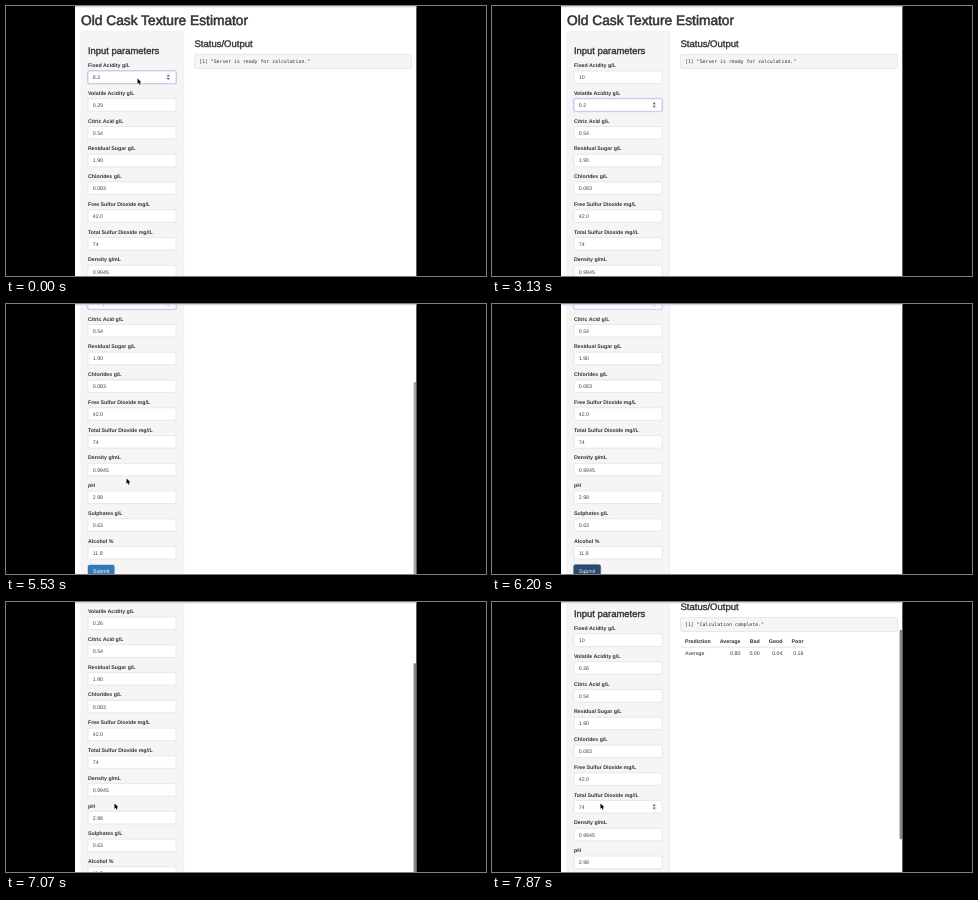
An HTML page with a canvas that plays this animation: 480x270 px, repeating every 8 s.

```html
<!DOCTYPE html>
<html lang="en">
<head>
<meta charset="utf-8">
<title>Old Cask Texture Estimator</title>
<style>
html, body { margin: 0; width: 100%; height: 100%; overflow: hidden; background: #000; }
canvas { display: block; width: 100vw; height: 100vh; }
</style>
</head>
<body>
<canvas id="stage"></canvas>
<script>
const W = 480, H = 270, LOOP = 8000, STEP = 1000 / 15, BLINK = 440;
const PAGE = { left: 69, right: 410.6 };
const FIELD = { x: 82, y: 65, w: 88, h: 12.5, pitch: 27.76 };
const SANS = '"Liberation Sans", Arial, sans-serif';
const MONO = '"DejaVu Sans Mono", monospace';
const PLAIN = `5.25px ${SANS}`, BOLD = `bold ${PLAIN}`;
const CLICK = 6133, RESULT = 7265;

const FIELDS = [
  ['Fixed Acidity g/L', '8.2'], ['Volatile Acidity g/L', '0.29'],
  ['Citric Acid g/L', '0.54'], ['Residual Sugar g/L', '1.90'],
  ['Chlorides g/L', '0.083'], ['Free Sulfur Dioxide mg/L', '42.0'],
  ['Total Sulfur Dioxide mg//L', '74'], ['Density g/mL', '0.9945'],
  ['pH', '2.98'], ['Sulphates g/L', '0.63'], ['Alcohol %', '11.8']
];
const SCORES = { Average: '0.80', Bad: '0.00', Good: '0.04', Poor: '0.16' };

// One editing session per field; edits map a time to the new text
const SESSIONS = [
  { from: -500, to: 2100, select: 133, caret: 600, blink: 1333, edits: { 600: '', 1333: '1', 1600: '10' } },
  { from: 2100, to: CLICK, select: 2200, caret: 2667, blink: 2667, edits: { 3067: '0.2', 4000: '0.26' } }
];

// Pointer moves: start, end, target
const MOVES = [
  [67, 200, 186, 19], [200, 400, 139, 72], [1000, 1200, 138, 100],
  [4333, 4600, 120.5, 174.5], [5600, CLICK, 93, 268.5], [6333, 6600, 108.5, 201.5]
];

const canvas = document.getElementById('stage');
const ctx = canvas.getContext('2d');

const ramp = (t, from, to) => Math.min(1, Math.max(0, (t - from) / (to - from)));
const within = (t, from, to) => t >= from - 1 && t < to - 1;

function smooth(t, from, to) {
  const u = ramp(t, from, to);
  return u * u * (3 - 2 * u);
}

const scrollAt = t => 100 * smooth(t, 4830, 5133) - 67 * smooth(t, 6667, 7700);
const barAlpha = t => ramp(t, 4800, 4866) - ramp(t, 5467, 5733) + ramp(t, 6733, 6799);

function pointerAt(t) {
  let x = 131.5, y = 72.5;
  for (const [from, to, toX, toY] of MOVES) {
    const k = smooth(t, from, to);
    x += (toX - x) * k;
    y += (toY - y) * k;
  }
  return { x, y };
}

function text(str, x, y, font, color, align = 'left') {
  ctx.font = font;
  ctx.fillStyle = color;
  ctx.textAlign = align;
  ctx.fillText(str, x, y);
}

// Medium weight: regular letters with a thin stroke
function heading(str, x, y, size) {
  text(str, x, y, `${size}px ${SANS}`, '#333');
  ctx.strokeStyle = '#333';
  ctx.lineWidth = size * 0.04;
  ctx.strokeText(str, x, y);
}

function box(x, y, w, h, fill, stroke, line = 0.4) {
  ctx.beginPath();
  ctx.roundRect(x, y, w, h, 1.5);
  ctx.fillStyle = fill;
  ctx.fill();
  ctx.strokeStyle = stroke;
  ctx.lineWidth = line;
  ctx.stroke();
}

function spinner(x, y) {
  ctx.fillStyle = '#f4f4f4';
  ctx.fillRect(x - 2.2, y - 3.8, 4.4, 7.6);
  ctx.fillStyle = '#555';
  for (const d of [-1, 1]) {
    ctx.beginPath();
    ctx.moveTo(x - 1.4, y + d * 0.8);
    ctx.lineTo(x + 1.4, y + d * 0.8);
    ctx.lineTo(x, y + d * 2.7);
    ctx.fill();
  }
}

function valueAt(i, t) {
  let value = FIELDS[i][1];
  for (const [time, edit] of Object.entries(SESSIONS[i]?.edits ?? {})) {
    if (t >= time - 1) value = edit;
  }
  return value;
}

function glow(x, y, w, h, alpha) {
  ctx.save();
  ctx.globalAlpha = alpha;
  box(x, y, w, h, '#fff', 'rgba(150,170,225,0.3)', 2.2);
  box(x, y, w, h, '#fff', '#a9b8dc', 0.6);
  ctx.restore();
}

function field(i, t, pointer) {
  const { x, w, h } = FIELD, y = FIELD.y + i * FIELD.pitch;
  const session = SESSIONS[i], value = valueAt(i, t), textX = x + 4.8;
  const focus = session ? ramp(t, session.from, session.from + 200) - ramp(t, session.to, session.to + 200) : 0;
  const hover = pointer && pointer.x > x && pointer.x < x + w && pointer.y > y && pointer.y < y + h;

  text(FIELDS[i][0], x, y - 3.9, BOLD, '#333');
  box(x, y, w, h, '#fff', '#ccc');
  if (focus > 0) glow(x, y, w, h, focus);

  ctx.font = PLAIN;
  const width = ctx.measureText(value).width;
  if (session && within(t, session.select, session.caret)) {
    ctx.fillStyle = '#b3d7ff';
    ctx.fillRect(textX, y + 3, width, 6.6);
  }
  text(value, textX, y + 8.2, PLAIN, '#444');
  if (session && within(t, session.caret, session.to)) {
    const lit = Math.floor((t + 1 - session.blink) / BLINK) % 2 === 0;
    ctx.fillStyle = '#333';
    if (lit) ctx.fillRect(textX + width + 0.2, y + 3.2, 0.5, 6.2);
  }
  if (focus > 0.5 || hover) spinner(162.2, y + h / 2);
}

function button(t) {
  const pressed = t >= CLICK;
  if (pressed) box(81.6, 360.6, 27.1, 13.3, '#d5dbe5', '#8a8f99', 0.8);
  box(82, 361, 26.3, 12.5, pressed ? '#2b4a70' : '#337ab7', pressed ? '#22395a' : '#2e6da4');
  text('Submit', 95.1, 369, PLAIN, pressed ? '#dce8ff' : '#fff', 'center');
}

function table() {
  const head = 73.8, row = 85.8, gap = 9.1;
  text('Average', 193, row, PLAIN, '#333');
  text('Prediction', 193, head, BOLD, '#333');
  let right = 193 + ctx.measureText('Prediction').width;
  for (const [name, score] of Object.entries(SCORES)) {
    ctx.font = BOLD;
    right += gap + Math.max(10.2, ctx.measureText(name).width);
    text(name, right, head, BOLD, '#333', 'right');
    text(score, right, row, PLAIN, '#333', 'right');
  }
  ctx.fillStyle = '#ddd';
  ctx.fillRect(189, 77.7, right - 186, 0.8);
}

function output(t) {
  const done = t >= RESULT;
  const message = done ? 'Calculation complete.' : 'Server is ready for calculation.';
  heading('Status/Output', 188.5, 41, 9.5);
  box(188.5, 48.5, 217, 14, '#f5f5f5', '#ccc');
  text(`[1] "${message}"`, 193, 57, `4.875px ${MONO}`, '#333');
  if (done) table();
}

function arrow({ x, y }) {
  const points = [[0, 0], [0, 5.4], [1.3, 4.3], [2.2, 6.3], [3.1, 5.9], [2.2, 4], [3.8, 3.8]];
  ctx.beginPath();
  points.forEach(([px, py]) => ctx.lineTo(x + px, y + py));
  ctx.closePath();
  ctx.strokeStyle = '#fff';
  ctx.lineWidth = 0.9;
  ctx.stroke();
  ctx.fillStyle = '#000';
  ctx.fill();
}

function scrollbar(scroll, alpha) {
  ctx.save();
  ctx.globalAlpha = alpha;
  ctx.fillStyle = '#858585';
  ctx.beginPath();
  ctx.roundRect(407.6, 3 + scroll * 0.75, 2.7, 209.5, 1.3);
  ctx.fill();
  ctx.restore();
}

function draw(t) {
  const scroll = scrollAt(t), cursor = pointerAt(t);
  const shown = !within(t, 600, 4400);
  const scrolling = within(t, 4867, 5200) || within(t, 6667, 7733);
  const pointer = shown && !scrolling ? { x: cursor.x, y: cursor.y + scroll } : null;

  ctx.fillStyle = '#000';
  ctx.fillRect(0, 0, W, H);
  ctx.save();
  ctx.beginPath();
  ctx.rect(PAGE.left, 0, PAGE.right - PAGE.left, H);
  ctx.clip();
  ctx.fillStyle = '#fff';
  ctx.fillRect(PAGE.left, 0, PAGE.right - PAGE.left, H);

  ctx.save();
  ctx.translate(0, -scroll);
  heading('Old Cask Texture Estimator', 75, 18.7, 13.75);
  box(75, 25, 102.8, 356, '#f5f5f5', '#e6e6e6');
  heading('Input parameters', 82, 48, 9.45);
  FIELDS.forEach((_, i) => field(i, t, pointer));
  button(t);
  output(t);
  ctx.restore();

  scrollbar(scroll, barAlpha(t));
  ctx.fillStyle = '#cdd7e6';
  ctx.fillRect(PAGE.left, 0, PAGE.right - PAGE.left, 1.3);
  if (shown) arrow(cursor);
  ctx.restore();
}

function resize() {
  const ratio = window.devicePixelRatio || 1;
  canvas.width = Math.round(innerWidth * ratio);
  canvas.height = Math.round(innerHeight * ratio);
  ctx.setTransform(canvas.width / W, 0, 0, canvas.height / H, 0, 0);
  ctx.textRendering = 'geometricPrecision';
  ctx.lineJoin = 'round';
}

const start = performance.now();
function tick() {
  const t = (performance.now() - start) % LOOP;
  draw(Math.floor((t + 4) / STEP) * STEP % LOOP);
  requestAnimationFrame(tick);
}

addEventListener('resize', resize);
resize();
tick();
</script>
</body>
</html>
```
